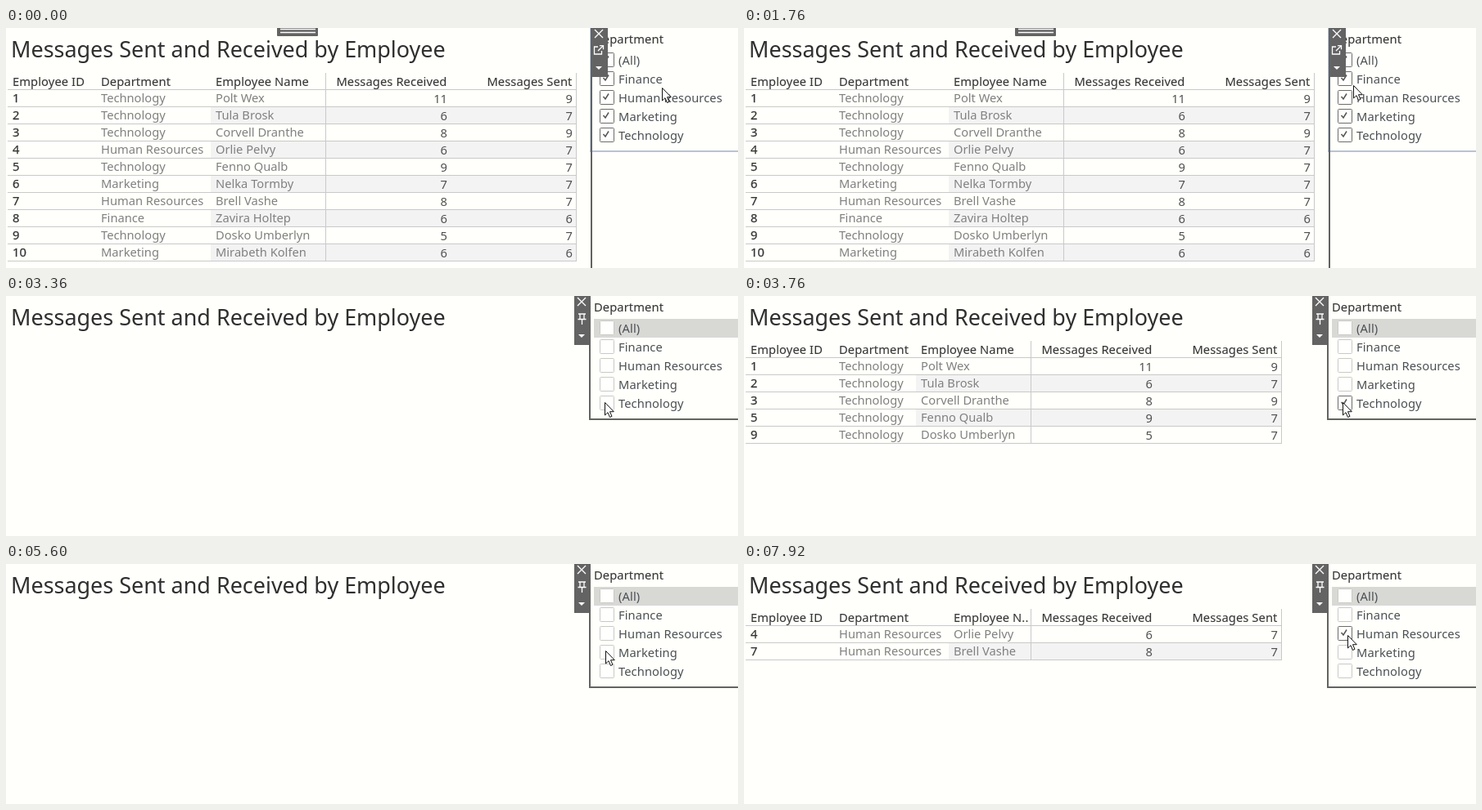
An HTML page for the animation above (8000 ms loop, 894x294 px).

```html
<!DOCTYPE html>
<html lang="en">
<head>
<meta charset="utf-8">
<title>Messages by employee</title>
<style>
  html, body { margin: 0; width: 100%; height: 100%; overflow: hidden; background: #fffffb; }
  svg { display: block; width: 894px; height: 294px; }
  text { font: 14.7px "Noto Sans", "Open Sans", sans-serif; fill: #505050; white-space: pre; }
  .title { font-size: 26.95px; fill: #2f2f2f; }
  .head { fill: #383838; stroke: #383838; stroke-width: .12px; letter-spacing: .1px; }
  .id { fill: #333; stroke: #333; stroke-width: .25px; }
  .soft { fill: #808080; }
  .option { fill: #4b5054; letter-spacing: .1px; }
  .rule { stroke: #c9c9c9; fill: none; }
  .band { fill: #f3f3f4; }
  .dark { fill: #636363; }
  .icon { stroke: #fff; stroke-width: 1.3; fill: none; }
  .box { fill: #fffffd; stroke: #c9c9c6; }
  .tick { fill: none; stroke: #555; stroke-width: 1.5; }
  .on .box { stroke: #6b6b6b; }
  g:not(.on) > .tick { display: none; }
  .hidden { display: none; }
</style>
</head>
<body>
<svg viewBox="0 0 894 294">
  <rect width="894" height="294" fill="#fffffb"/>
  <text class="title" x="6" y="36">Messages Sent and Received by Employee</text>
  <g id="tables"></g>
  <rect id="highlight" x="718" y="28" width="176" height="23" fill="#d8d8d5"/>
  <text class="head" x="718" y="19">Department</text>
  <g id="filters"></g>

  <g id="container">
    <rect class="dark" x="331" y="-1" width="50" height="11" rx="1"/>
    <path class="icon" d="M335 1.500h43M335 5.500h43"/>
    <path d="M713.5 0V151" stroke="#c3cbd8" fill="none"/>
    <path d="M713 151H894" stroke="#9fb1cc" stroke-width="1.6" fill="none"/>
    <rect class="dark" x="714" y="59" width="2" height="235"/>
    <rect class="dark" x="714" width="21" height="60"/>
    <path class="icon" d="M719 2l10 10M729 2l-10 10M723 23h-4.500v9h9v-4M723 28l6-6M725 21.700h4.500v4.500"/>
    <path d="M720 47h8l-4 4z" fill="#fff"/>
  </g>

  <g id="selected">
    <path d="M713 0V151H894" stroke="#636363" stroke-width="2" fill="none"/>
    <rect class="dark" x="694" width="20" height="60"/>
    <path class="icon" d="M698 2l10 10M708 2l-10 10M699 22h9M701 22v6M706 22v6M698.500 28.500h10M703.500 29v6"/>
    <path d="M699 47h8l-4 4z" fill="#fff"/>
  </g>

  <path id="cursor" d="M.5 .5V16L4 12.700 6.500 18.500 9 17.400 6.500 11.700H11.300Z" fill="#fff" stroke="#111"/>
</svg>
<script>
const F = "Finance", H = "Human Resources", M = "Marketing", T = "Technology";
const departments = [F, H, M, T];

// department, name, received, sent
const staff = [
  [T, "Polt Wex", 11, 9],
  [T, "Tula Brosk", 6, 7],
  [T, "Corvell Dranthe", 8, 9],
  [H, "Orlie Pelvy", 6, 7],
  [T, "Fenno Qualb", 9, 7],
  [M, "Nelka Tormby", 7, 7],
  [H, "Brell Vashe", 8, 7],
  [F, "Zavira Holtep", 6, 6],
  [T, "Dosko Umberlyn", 5, 7],
  [M, "Mirabeth Kolfen", 6, 6]
].map(([dept, name, received, sent], i) => ({ id: i + 1, dept, name, received, sent }));

const layouts = {
  all: { nameX: 256, split: 390 },
  [T]: { nameX: 216, split: 350 },
  [M]: { nameX: 196, split: 310, deptHead: "Departm.." },
  [H]: { nameX: 256, split: 350, nameHead: "Employee N.." }
};

const LOOP = 8000, STEP = 80;
const tableTrack = [[0, "all"], [3360, ""], [3680, T], [5440, ""], [6080, M], [7600, H]];
const checkTrack = [[0, "all"], [2720, ""], [3440, T], [4640, ""], [5760, M], [6640, ""], [7360, H]];
const selectTime = 2560;
const cursorTrack = [
  [0, 801, 73], [320, 801, 73], [960, 743, 129], [1200, 743, 129], [2160, 745, 34],
  [2320, 745, 34], [2400, 743, 34], [2720, 743, 34], [3200, 731, 130], [4720, 731, 130],
  [5120, 732, 106], [5760, 732, 106], [6000, 734, 106], [6720, 734, 106], [7120, 737, 87], [LOOP, 737, 87]
];

const $ = id => document.getElementById(id);

function add(parent, tag, attrs, content = "") {
  const el = document.createElementNS("http://www.w3.org/2000/svg", tag);
  for (const key in attrs) el.setAttribute(key, attrs[key]);
  el.textContent = content;
  return parent.appendChild(el);
}

function label(parent, x, y, content, cls = "", anchor = "start") {
  add(parent, "text", { x, y, class: cls, "text-anchor": anchor }, content);
}

function buildTable(key) {
  const { nameX, split, deptHead = "Department", nameHead = "Employee Name" } = layouts[key];
  const rows = staff.filter(p => key === "all" || p.dept === key);
  const g = add($("tables"), "g", {});
  const right = split + 306, receivedX = split + 149, sentX = split + 302;
  const bottom = 75 + rows.length * 21;

  rows.forEach((_, i) => {
    if (i % 2) add(g, "rect", { class: "band", x: nameX - 6, y: 75 + i * 21, width: right - nameX + 6, height: 21 });
  });
  let d = `M${split + .5} 55V${bottom}M${right + .5} 55V${bottom + 1}`;
  for (let y = 75.5; y <= bottom + 1; y += 21) d += `M2 ${y}H${right}`;
  add(g, "path", { class: "rule", d });

  label(g, 8, 70.5, "Employee ID", "head");
  label(g, 116, 70.5, deptHead, "head");
  label(g, nameX, 70.5, nameHead, "head");
  label(g, receivedX - .5, 70.5, "Messages Received", "head", "end");
  label(g, sentX - .5, 70.5, "Messages Sent", "head", "end");

  rows.forEach((p, i) => {
    const y = 91 + i * 21;
    label(g, 8, y, p.id, "id");
    label(g, 116, y, p.dept, "soft");
    label(g, nameX, y, p.name, "soft");
    label(g, receivedX, y + .7, p.received, "", "end");
    label(g, sentX, y + .7, p.sent, "", "end");
  });
  return g;
}

function buildFilter(name, i) {
  const y = 30.5 + i * 23;
  const g = add($("filters"), "g", {});
  add(g, "rect", { class: "box", x: 725.5, y, width: 17, height: 17, rx: 1 });
  add(g, "path", { class: "tick", d: `M729.5 ${y + 7.5}l2.500 3 4-6.500` });
  label(g, 748, y + 14.5, name, "option");
  return { name, g };
}

const tables = Object.keys(layouts).map(key => ({ key, g: buildTable(key) }));
const filters = ["(All)", ...departments].map(buildFilter);

const valueAt = (track, t) => track.filter(([start]) => start <= t).pop()[1];

function cursorAt(t) {
  const i = cursorTrack.findIndex(([time]) => time > t);
  const [t0, x0, y0] = cursorTrack[i - 1], [t1, x1, y1] = cursorTrack[i];
  const u = (t - t0) / (t1 - t0), e = u * u * (3 - 2 * u);
  return [x0 + (x1 - x0) * e, y0 + (y1 - y0) * e].map(Math.round);
}

const show = (el, visible) => el.classList.toggle("hidden", !visible);

function draw(t) {
  const table = valueAt(tableTrack, t), checked = valueAt(checkTrack, t);
  const selected = t >= selectTime;
  tables.forEach(({ key, g }) => show(g, key === table));
  filters.forEach(({ name, g }) => g.classList.toggle("on", checked === "all" || checked === name));
  show($("container"), !selected);
  show($("selected"), selected);
  show($("highlight"), selected);
  $("cursor").setAttribute("transform", `translate(${cursorAt(t)})`);
}

const begin = performance.now();
function tick() {
  const t = (performance.now() - begin) % LOOP;
  draw(Math.floor(t / STEP) * STEP);
  requestAnimationFrame(tick);
}
draw(0);
tick();
</script>
</body>
</html>
```
